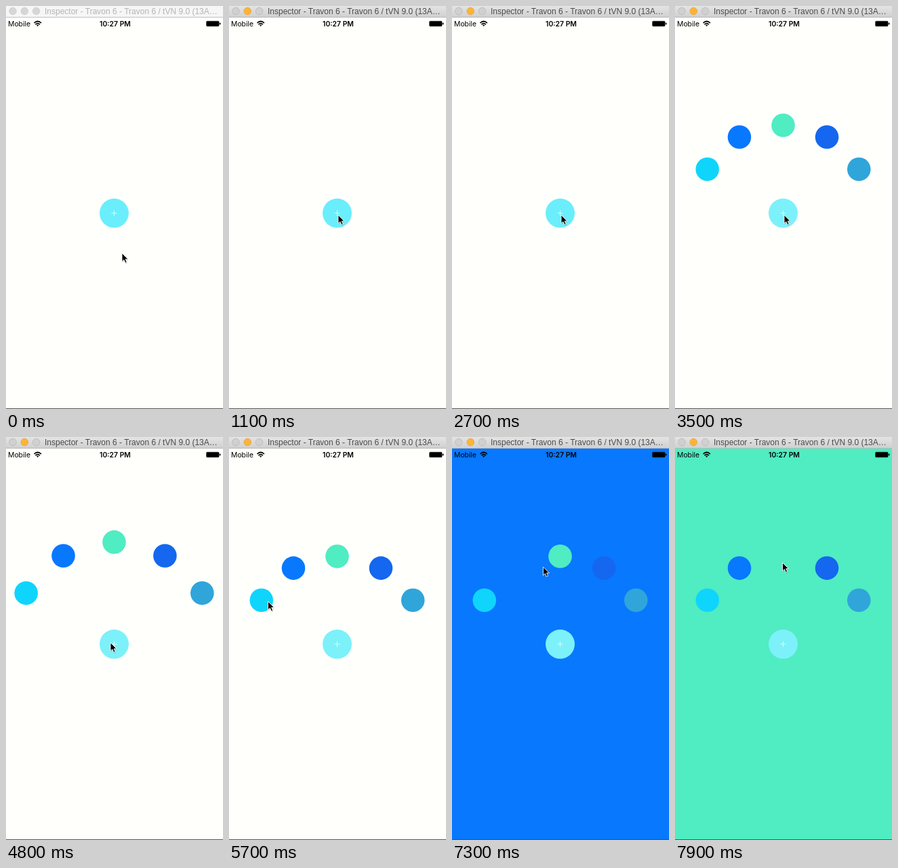
Write an HTML page that moves like this. It is 320 px wide and 592 px high and loops after 8000 ms.

```html
<!DOCTYPE html>
<html lang="en">
<head>
<meta charset="utf-8">
<title>Radial menu</title>
<style>
  html, body { margin: 0; width: 100%; height: 100%; overflow: hidden; background: #fffffc; }
  svg { display: block; width: 320px; height: 592px; }
  .title { font: 12px "Liberation Sans", Arial, sans-serif; fill: #4b4b4d; }
  .status { font: 10.4px Inter, Roboto, sans-serif; fill: #000; }
  .time { font-weight: 600; text-anchor: middle; }
  .lamp { fill: #d0d0d0; stroke: #b4b4b4; stroke-width: .7; }
  .lamp.lit { fill: #fdb436; stroke: #dfa03a; }
  .inactive .bar { fill: #f6f6f6; }
  .inactive .title { fill: #b4b4ba; }
  .inactive .lamp { fill: #d6d6d6; stroke: #c9c9c9; }
</style>
</head>
<body>
<svg viewBox="0 0 320 592">
  <defs>
    <linearGradient id="metal" x2="0" y2="1">
      <stop stop-color="#e4e4e4"/>
      <stop offset="1" stop-color="#cfcfcf"/>
    </linearGradient>
  </defs>
  <rect id="screen" width="320" height="592"/>
  <g id="window">
    <rect class="bar" width="320" height="17" fill="url(#metal)"/>
    <path d="M0 16.5H320" stroke="#b4b4b4" stroke-width=".8"/>
    <circle class="lamp" cx="10" cy="7.5" r="5.3"/>
    <circle class="lamp lit" cx="27.3" cy="7.5" r="5.3"/>
    <circle class="lamp" cx="44.6" cy="7.5" r="5.3"/>
    <text class="title" x="57" y="12">Inspector - Travon 6 - Travon 6 / tVN 9.0 (13A…</text>
  </g>
  <text class="status" x="3" y="30">Mobile</text>
  <g fill="none" stroke="#000" stroke-width="1.7">
    <path d="M41.5 25Q46.7 20 52 25M43.5 27.2Q46.7 24.2 50 27.2"/>
    <path d="M45 28.2Q46.7 26.8 48.4 28.2L46.7 30Z" fill="#000" stroke="none"/>
  </g>
  <text class="status time" x="161" y="30">10:27 PM</text>
  <rect x="295.5" y="22.2" width="18.6" height="7.6" rx="1.4" stroke="#000" stroke-opacity=".5" stroke-width=".8"/>
  <rect x="314.8" y="24.4" width="1.6" height="3.2" rx=".8"/>
  <g id="dots"></g>
  <circle id="button" cx="159.5" cy="304.3" r="21.5"/>
  <path d="M155.5 304.3H163.5M159.5 300.3V308.3" stroke="#d2fffc"/>
  <path d="M0 591.5H320" stroke="#555"/>
  <g id="cursor">
    <path d="M0 0V12.4L2.9 9.8L5 14.4L7.2 13.4L5.2 9H9Z" transform="translate(.6 1.4)" opacity=".2"/>
    <path d="M0 0V12.4L2.9 9.8L5 14.4L7.2 13.4L5.2 9H9Z" stroke="#fff" stroke-width=".9"/>
  </g>
</svg>
<script>
const LOOP = 8000, STEP = 100, RADIUS = 129;
const WHITE = [255, 255, 252];
const COLORS = [[15, 213, 252], [8, 120, 255], [80, 236, 194], [20, 103, 238], [48, 165, 218]];

const toggles = [[1100, 1], [2100, 0], [2800, 1], [3950, 0], [4550, 1]];
const fills = [[0, WHITE], [5900, COLORS[0]], [6800, COLORS[1]], [7500, COLORS[2]]];
// time, x, y of the pointer tip
const pointer = [
  [0, 171, 363], [400, 171, 363], [900, 161, 307], [4600, 161, 307], [4800, 154, 302],
  [4900, 154, 302], [5500, 57.5, 241.5], [6200, 57.5, 241.5], [6600, 90, 202.5], [7000, 90, 202.5],
  [7500, 158.5, 184.5], [LOOP, 158.5, 184.5]
];

const byId = id => document.getElementById(id);
const clamp = v => Math.max(0, Math.min(1, v));
const smooth = v => v * v * (3 - 2 * v);
const mix = (a, b, k) => a + (b - a) * k;
const rgb = c => `rgb(${c.map(Math.round)})`;
const mixColor = (a, b, k) => rgb(a.map((v, i) => mix(v, b[i], k)));

const dots = COLORS.map(color => {
  const dot = document.createElementNS("http://www.w3.org/2000/svg", "circle");
  dot.setAttribute("r", 17.3);
  dot.setAttribute("fill", rgb(color));
  return byId("dots").appendChild(dot);
});

function spring(s) {
  const decay = 6.9, freq = 12;
  return 1 - Math.exp(-decay * s) * (Math.cos(freq * s) + decay / freq * Math.sin(freq * s));
}

function openness(t) {
  const last = toggles.filter(([at]) => at <= t).pop();
  if (!last) return 0;
  const s = (t - last[0]) / 1000;
  return last[1] ? spring(s) : (1 - clamp(s / .35)) ** 2;
}

function background(t) {
  const i = fills.filter(([at]) => at <= t).length - 1;
  const [at, color] = fills[i];
  return mixColor(i ? fills[i - 1][1] : WHITE, color, clamp((t - at) / 300));
}

function pointerAt(t) {
  const i = pointer.findIndex(([at]) => at > t);
  const [t0, x0, y0] = pointer[i - 1], [t1, x1, y1] = pointer[i];
  const k = smooth((t - t0) / (t1 - t0));
  return [mix(x0, x1, k), mix(y0, y1, k)];
}

function draw() {
  const t = Math.floor(performance.now() % LOOP / STEP) * STEP;
  const open = openness(t);
  byId("window").classList.toggle("inactive", t < 100);
  byId("screen").setAttribute("fill", background(t));
  byId("button").setAttribute("fill", mixColor([106, 238, 252], [124, 241, 250], clamp(open)));
  dots.forEach((dot, i) => {
    const angle = (150 - 30 * i) * Math.PI / 180;
    dot.setAttribute("cx", 159.5 + RADIUS * open * Math.cos(angle));
    dot.setAttribute("cy", 304.3 - RADIUS * open * Math.sin(angle));
  });
  byId("cursor").setAttribute("transform", `translate(${pointerAt(t)})`);
  requestAnimationFrame(draw);
}
draw();
</script>
</body>
</html>
```
